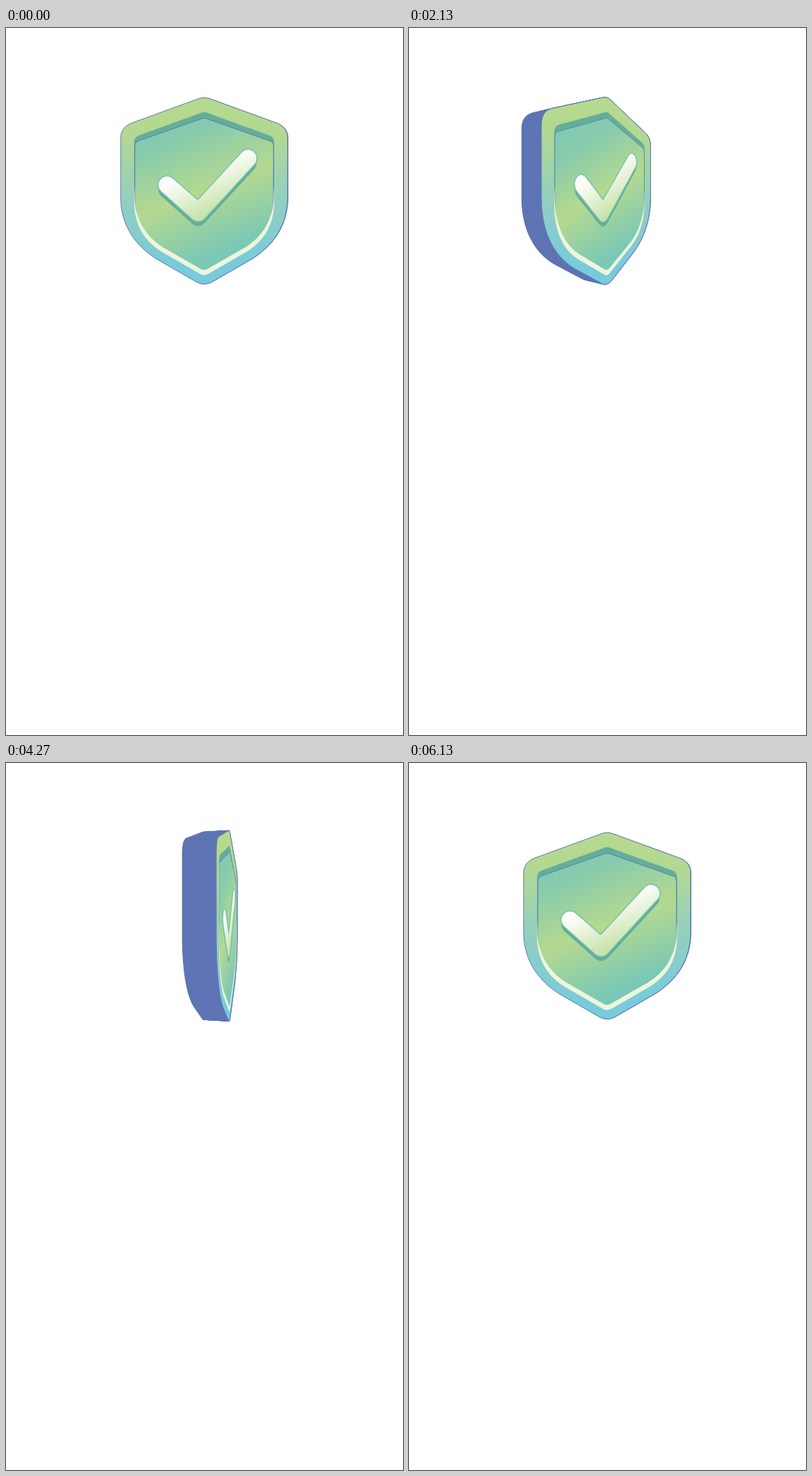
An HTML page with a canvas that plays this animation: 561x998 px, repeating every 6.23 s.

```html
<!DOCTYPE html>
<html lang="en">
<head>
<meta charset="utf-8">
<title>Turning shield</title>
<style>
  html, body { margin: 0; width: 100%; height: 100%; overflow: hidden; background: #fff; }
  canvas { display: block; }
</style>
</head>
<body>
<canvas id="stage" width="561" height="998"></canvas>
<script>
const ctx = document.getElementById('stage').getContext('2d');
const CX = 280, CY = 230, CAMERA = 450, DEPTH = 36;
const TURN = 3115, SPIN_START = 190, SPIN_TIME = 2630;
const BLUE = '#5e74b4', TEAL = '#63ae9b';

// Samples an SVG path into points relative to the shield's centre.
function outline(d, count) {
  const path = document.createElementNS('http://www.w3.org/2000/svg', 'path');
  path.setAttribute('d', d);
  const length = path.getTotalLength();
  return Array.from({ length: count }, (_, i) => {
    const p = path.getPointAtLength(length * i / count);
    return [p.x - CX, p.y - CY];
  });
}

const rim = outline('M270,100.5Q280,96.2 290,100.5L382,134Q398,140 398,156V238C398,280 376,309 344,328L291,358.5Q280,364.5 269,358.5L216,328C184,309 162,280 162,238V156Q162,140 178,134Z', 260);
const recess = outline('M275,120Q280,117.5 285,120L372,151.5Q379,154 379,162V244C379,283 360,304 338,317L286,347Q280,350.5 274,347L222,317C200,304 181,283 181,244V162Q181,154 188,151.5Z', 220);
const panel = outline('M275,128.5Q280,126 285,128.5L373,159.5Q378,161 378,167V238C378,276 356,300 334,312L285,340Q280,343 275,340L226,312C204,300 182,276 182,238V167Q182,161 187,159.5Z', 220);
const tick = outline('M234.9,212A12 12 0 0 0 219.1,230L263.6,269.5A12 12 0 0 0 280.3,268.7L350.8,192.2A12 12 0 0 0 333.2,175.8L271,243.3Z', 200);

function gradient(x0, y0, x1, y1, ...stops) {
  const g = ctx.createLinearGradient(x0 - CX, y0 - CY, x1 - CX, y1 - CY);
  stops.forEach(([at, color]) => g.addColorStop(at, color));
  return g;
}

const rimFill = gradient(280, 98, 280, 362, [0, '#b6da8c'], [.2, '#b2d893'], [.58, '#90cec3'], [.88, '#79cbdb'], [1, '#76cbdd']);
const recessFill = gradient(280, 118, 280, 349, [0, TEAL], [.45, TEAL], [.5, '#eef6da'], [1, '#eef6da']);
const panelFill = gradient(240, 130, 320, 328, [0, '#83cab0'], [.12, '#86cbad'], [.5, '#b4d98f'], [.92, '#7bc8b5'], [1, '#78c8b8']);
const panelLine = gradient(280, 127, 280, 342, [0, BLUE], [.45, BLUE], [.65, '#5e74b400'], [1, '#5e74b400']);
const tickFill = gradient(225, 205, 255, 275, [0, '#ffffff'], [.25, '#fafcf6'], [1, '#c8e3ab']);

// Solves the ease-in-out bezier (.42, 0, .58, 1).
function easeInOut(x) {
  let lo = 0, hi = 1;
  for (let i = 0; i < 24; i++) {
    const s = (lo + hi) / 2, r = 1 - s;
    if (1.26 * s * r * r + 1.74 * s * s * r + s * s * s < x) lo = s; else hi = s;
  }
  return lo * lo * (3 - 2 * lo);
}

function projector(angle, z) {
  const c = Math.cos(angle), s = Math.sin(angle);
  return ([x, y]) => {
    const k = CAMERA / (CAMERA - z * c + x * s);
    return [CX + (x * c + z * s) * k, CY + y * k];
  };
}

function trace(points) {
  ctx.beginPath();
  points.forEach(p => ctx.lineTo(...p));
  ctx.closePath();
}

function drawBody(near, far) {
  ctx.fillStyle = ctx.strokeStyle = BLUE;
  ctx.lineWidth = 1;
  for (const ring of [near, far]) { trace(ring); ctx.fill(); }
  near.forEach((p, i) => {
    const j = (i + 1) % near.length;
    trace([p, near[j], far[j], far[i]]);
    ctx.fill();
    ctx.stroke();
  });
}

function drawFace(project, shine) {
  const o = project([0, 0]), l = project([-60, 0]), r = project([60, 0]);
  const t = project([0, -60]), b = project([0, 60]);
  const toFace = () => ctx.setTransform((r[0] - l[0]) / 120, 0, 0, (b[1] - t[1]) / 120, ...o);
  const reset = () => ctx.setTransform(1, 0, 0, 1, 0, 0);
  const shape = (points, fill, dx = 0, dy = 0) => {
    trace(points.map(([x, y]) => project([x + dx, y + dy])));
    toFace();
    ctx.fillStyle = fill;
    ctx.fill();
    reset();
  };
  const line = (color, width) => {
    ctx.strokeStyle = color;
    ctx.lineWidth = width;
    ctx.stroke();
  };

  shape(rim, BLUE, 1);
  shape(rim, rimFill);
  line(BLUE, 1);
  shape(recess, recessFill);
  shape(panel, panelFill);
  toFace();
  line(panelLine, 1);
  reset();

  for (let dy = 7; dy > 0; dy--) shape(tick, TEAL, 0, dy);
  shape(tick, '#74c2ae');
  line('#74c2ae', 3);
  shape(tick, tickFill);

  if (shine === null) return;
  const g = ctx.createLinearGradient(shine - 31, -15.5, shine + 31, 15.5);
  [0, .4, .3, .55, .42, 0].forEach((a, i) => g.addColorStop(i / 5, `rgba(250,255,240,${a})`));
  shape(rim, g);
}

function draw(time) {
  const t = time % TURN;
  const progress = Math.min(1, Math.max(0, (t - SPIN_START) / SPIN_TIME));
  const angle = -2 * Math.PI * easeInOut(progress);
  const front = projector(angle, 0);
  const back = projector(angle + Math.PI, DEPTH);
  const frontRing = rim.map(front);
  // The same rim seen on the back plane, paired point by point.
  const backRing = rim.map(projector(angle, -DEPTH));

  ctx.fillStyle = '#fff';
  ctx.fillRect(0, 0, 561, 998);
  if (Math.abs(Math.sin(angle)) > .01) drawBody(frontRing, backRing);
  const facing = Math.cos(angle);
  if (facing > .001) drawFace(front, t < 1300 ? -244 + t * .345 : null);
  else if (-facing > DEPTH / CAMERA) drawFace(back, null);
}

function tickFrame() {
  draw(performance.now());
  requestAnimationFrame(tickFrame);
}
tickFrame();
</script>
</body>
</html>
```
